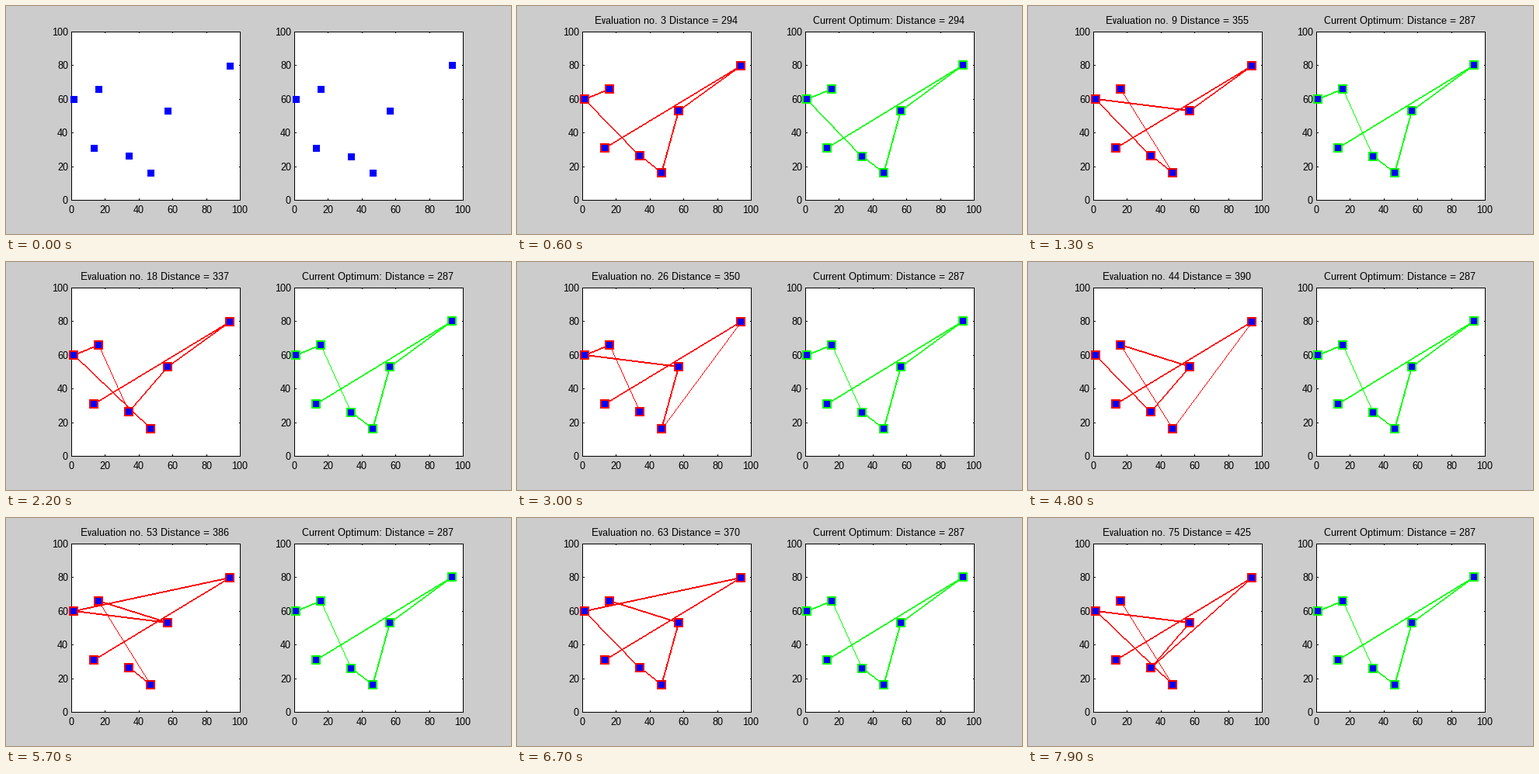
A matplotlib script that plays this animation: 650 by 294 pixels, repeating every 8 s.

```python
from itertools import islice, permutations
from math import dist

import matplotlib.pyplot as plt
import numpy as np
from matplotlib.animation import FuncAnimation
from matplotlib.colors import to_rgb
from matplotlib.patches import Rectangle

W, H, DPI = 650, 294, 100
SIDE = 217             # plot size in pixels
TOP, BOTTOM = 33, 250
SCALE = SIDE / 100
FRAMES = 80
# listed in the order in which the search permutes them
CITIES = [(13, 31), (94, 80), (57, 53), (47, 16), (1, 60), (34, 26), (16, 66)]

plt.rcParams.update({
    "font.family": "Liberation Sans",
    "font.size": 13 * 72 / DPI,
    "text.hinting": "native",
    "text.hinting_factor": 1,
})

fig = plt.figure(figsize=(W / DPI, H / DPI), dpi=DPI, facecolor="#cccccc")
ax = fig.add_axes([0, 0, 1, 1])
ax.axis("off")


def box(x, y, w, h, color, z=1):
    return ax.add_patch(Rectangle((x, y), w, h, fc=color, lw=0,
                                  antialiased=False, zorder=z))


def length(tour):
    return sum(dist(a, b) for a, b in zip(tour, tour[1:] + tour[:1]))


def stroke(mask, a, b):
    """Mark a jagged two-pixel line; moderately steep ones are one pixel wide."""
    dx, dy = abs(b[0] - a[0]), abs(b[1] - a[1])
    n = max(dx, dy) + 1
    x = np.rint(np.linspace(a[0], b[0], n)).astype(int)
    y = np.rint(np.linspace(a[1], b[1], n)).astype(int)
    mask[y, x] = 1
    if dx >= dy:
        mask[y - 1, x] = 1
    elif not 1.25 < dy / dx < 3:
        mask[y, x - 1] = 1


class Panel:
    def __init__(self, left, origin, scale_y, color):
        self.origin, self.scale_y = origin, scale_y
        self.draw_axes(left)
        self.rims = []
        for city in CITIES:
            x, y = self.pixel(city)
            box(x - 4, y - 4, 9, 9, "#0000ff", 2)
            self.rims += [box(x - 6, y - 6, 12, 12, color, 4),
                          box(x - 4, y - 4, 8, 8, "#0000ff", 5)]
        self.ink = np.zeros((H, W, 4))
        self.ink[..., :3] = to_rgb(color)
        self.lines = ax.imshow(self.ink, extent=(0, W, H, 0), aspect="auto",
                               interpolation="nearest", zorder=3)
        self.title = ax.text(left + SIDE / 2 - 1, 23, "", ha="center", va="baseline")

    def draw_axes(self, left):
        box(left, TOP, SIDE + 1, SIDE + 1, "black")
        box(left + 1, TOP + 1, SIDE - 1, SIDE - 1, "white")
        for v in range(0, 101, 20):
            x, y = left + round(v * SCALE), BOTTOM - round(v * SCALE)
            box(x, TOP, 1, 2, "black")
            box(x, BOTTOM - 2, 1, 3, "black")
            box(left, y, 3, 1, "black")
            box(left + SIDE - 1, y, 2, 1, "black")
            ax.text(x, 267, str(v), ha="center", va="baseline")
            ax.text(left - 4, y + 5, str(v), ha="right", va="baseline")

    def pixel(self, city):
        x0, y0 = self.origin
        return round(x0 + city[0] * SCALE), round(y0 - city[1] * self.scale_y)

    def show(self, tour, title):
        pts = [self.pixel(c) for c in tour or []]
        mask = self.ink[..., 3]
        mask[:] = 0
        for a, b in zip(pts, pts[1:]):
            stroke(mask, a, b)
        self.lines.set_data(self.ink)
        for rim in self.rims:
            rim.set_visible(bool(tour))
        self.title.set_text(title if tour else "")


def search():
    """Steps of the exhaustive search; each improvement takes a step of its own."""
    steps, best = [(0, None, None)], None
    for n, tour in enumerate(islice(permutations(CITIES), FRAMES), 1):
        steps.append((n, tour, best))
        if best is None or length(tour) < length(best):
            best = tour
            steps.append((n, tour, best))
    return steps[:FRAMES]


trial = Panel(84, (84.5, 249.55), 2.16, "#ff0000")
optimum = Panel(371, (370.5, 250), SCALE, "#00ff00")
ax.set_xlim(0, W)
ax.set_ylim(H, 0)
STEPS = search()


def update(i):
    n, tour, best = STEPS[i]
    trial.show(tour, tour and f"Evaluation no. {n} Distance = {length(tour):.0f}")
    optimum.show(best, best and f"Current Optimum: Distance = {length(best):.0f}")
    return []


anim = FuncAnimation(fig, update, frames=FRAMES, interval=100,
                     init_func=lambda: update(0), repeat=True, repeat_delay=0)
plt.show()
```
